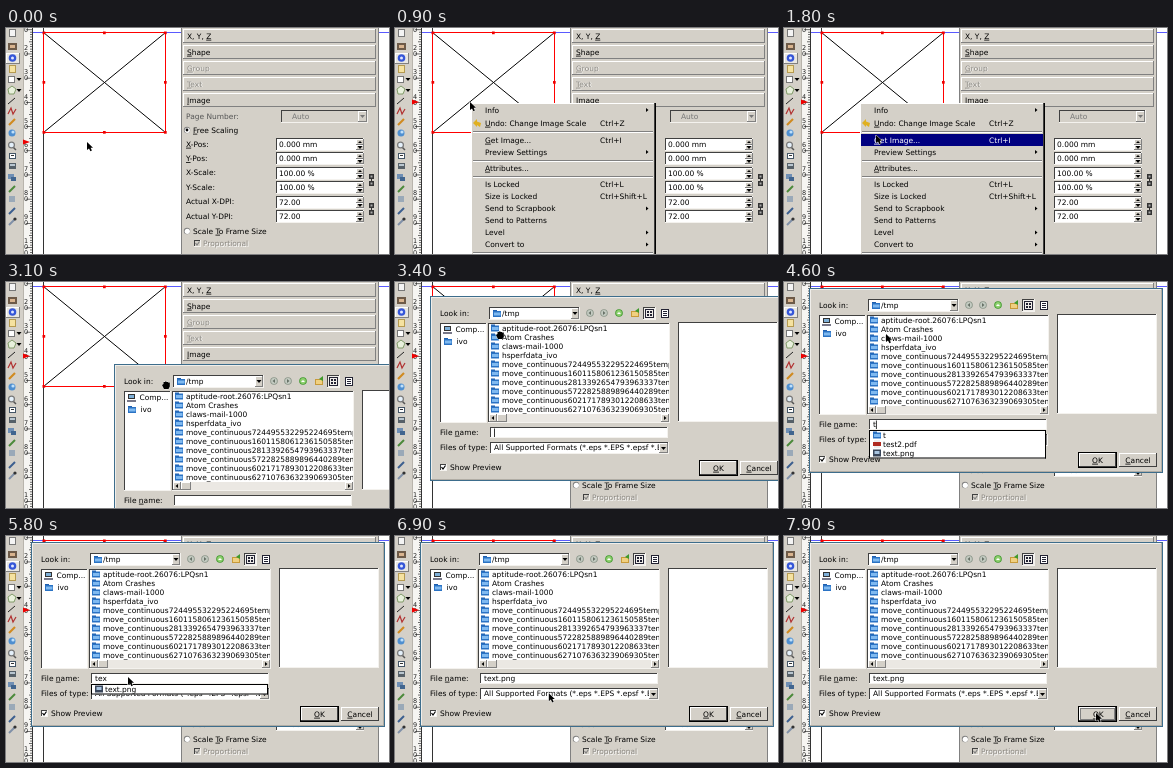
Recreate the animation shown at these times as an HTML page with a canvas. Size 383 by 226 pixels, loop 8000 ms.

```html
<!DOCTYPE html>
<html lang="en">
<head>
<meta charset="utf-8">
<title>Get Image dialog</title>
<style>
html, body { margin: 0; width: 100%; height: 100%; overflow: hidden; background: #fff; }
canvas { display: block; }
</style>
</head>
<body>
<canvas id="stage" width="383" height="226"></canvas>
<script>
const ctx = document.getElementById('stage').getContext('2d');
const LOOP = 8000, STEP = 100;
const FACE = '#d4d0c8', SHADE = '#808080', DARK = '#404040', NAVY = '#000080';

// Keyframes: [time, x, y]
const pointerKeys = [
  [0, 81, 114], [400, 75, 73], [700, 75, 73], [800, 75, 74], [1300, 75, 74], [1400, 78, 80],
  [1500, 84, 94], [1600, 90, 111], [1700, 92, 115], [1800, 92, 107], [2400, 92, 107], [2500, 270, 214],
  [4100, 106, 49], [4200, 102, 52], [5300, 102, 52], [5800, 122, 141], [6000, 122, 148], [6100, 121, 149],
  [6800, 121, 149], [7300, 285, 190], [7400, 300, 192], [7700, 312, 177]];
const handKeys = [[3100, 160, 103], [3200, 121, 66], [3300, 121, 66], [3400, 105, 53], [3600, 101, 49]];
const dialogKeys = [[3100, 83, 76], [3200, 40, 28], [3300, 40, 28], [3400, 10, 8], [3500, 4, 4],
  [3600, 2, 3], [3700, 2, 3], [3800, 1, 1], [3900, 0, 0]];

function at(keys, t) {
  const i = keys.findIndex(k => k[0] > t);
  if (i < 0) return keys[keys.length - 1].slice(1);
  if (i === 0) return keys[0].slice(1);
  const a = keys[i - 1], b = keys[i], p = (t - a[0]) / (b[0] - a[0]);
  return [a[1] + (b[1] - a[1]) * p, a[2] + (b[2] - a[2]) * p];
}

function rect(x, y, w, h, color) {
  ctx.fillStyle = color;
  ctx.fillRect(x, y, w, h);
}

function frame(x, y, w, h, topLeft, bottomRight = topLeft) {
  rect(x, y, w, 1, topLeft);
  rect(x, y, 1, h, topLeft);
  rect(x, y + h - 1, w, 1, bottomRight);
  rect(x + w - 1, y, 1, h, bottomRight);
}

function raised(x, y, w, h, fill = FACE) {
  rect(x, y, w, h, fill);
  frame(x, y, w, h, '#fff', SHADE);
}

function sunken(x, y, w, h, fill = '#fff') {
  rect(x, y, w, h, fill);
  frame(x, y, w, h, DARK, '#f4f2ee');
}

function line(color, width, ...points) {
  ctx.strokeStyle = color;
  ctx.lineWidth = width;
  ctx.beginPath();
  for (let i = 0; i < points.length; i += 2) ctx.lineTo(points[i], points[i + 1]);
  ctx.stroke();
}

function poly(color, ...points) {
  ctx.fillStyle = color;
  ctx.beginPath();
  for (let i = 0; i < points.length; i += 2) ctx.lineTo(points[i], points[i + 1]);
  ctx.closePath();
  ctx.fill();
}

function disc(x, y, r, color) {
  ctx.fillStyle = color;
  ctx.beginPath();
  ctx.arc(x, y, r, 0, 7);
  ctx.fill();
}

function setFont(size = 7.47) {
  ctx.font = size + 'px "DejaVu Sans", sans-serif';
}

// y is the middle of the capitals; "&" underlines the next letter
function text(str, x, y, color = '#000', size = 7.47) {
  setFont(size);
  ctx.fillStyle = color;
  const mark = str.indexOf('&'), plain = str.replace('&', '');
  ctx.fillText(plain, x, y + size * .36);
  if (mark >= 0)
    rect(x + ctx.measureText(plain.slice(0, mark)).width, y + 3.7, ctx.measureText(plain[mark]).width, .8, color);
  return ctx.measureText(plain).width;
}

function disabledText(str, x, y) {
  text(str, x + .8, y + .8, '#fff');
  text(str, x, y, '#8a8780');
}

const down = (x, y, c = '#000') => poly(c, x - 2.5, y - 1, x + 2.5, y - 1, x, y + 2);
const up = (x, y, c = '#000') => poly(c, x - 2, y + 1, x + 2, y + 1, x, y - 1);
const right = (x, y, c = '#000') => poly(c, x - 1, y - 2, x + 1.5, y, x - 1, y + 2);
const left = (x, y, c = '#000') => poly(c, x + 1, y - 2, x - 1.5, y, x + 1, y + 2);

function folder(x, y) {
  rect(x - 4, y - 3.5, 4, 2, '#1f5fae');
  rect(x - 4, y - 2.5, 8, 6, '#2a72c4');
  rect(x - 3, y - 1, 6.5, 3, '#7fb9f0');
}

function toolbar() {
  rect(0, 0, 17, 226, FACE);
  raised(0, 25, 14, 11, '#e9e7e2');
  frame(3, 1, 7, 8, '#777');
  rect(4, 2, 5, 6, '#f4f4f4');
  rect(2, 15, 9, 7, '#6d5a48');
  rect(4, 17, 5, 3, '#d9b48f');
  disc(6.5, 30, 3.8, '#3556d8');
  disc(6.5, 30, 1.5, '#dfe6ff');
  rect(3, 37, 7, 8, '#f5e2a0');
  frame(3, 37, 7, 8, '#b59a50');
  rect(2, 48, 7, 7, '#fff');
  frame(2, 48, 7, 7, '#777');
  poly('#e8f0dc', 6, 58, 10, 61, 8, 66, 3, 66, 2, 61);
  line('#6a8a50', .8, 6, 58, 10, 61, 8, 66, 3, 66, 2, 61, 6, 58);
  down(13, 51);
  down(13, 62);
  line('#222', 1, 2, 76, 9, 70);
  line('#b03030', 1.2, 2, 86, 5, 80, 7, 86, 10, 81);
  line('#d08a20', 2.2, 3, 97, 9, 91);
  disc(6, 105, 3.5, '#4f8fd0');
  disc(7, 104, 1.6, '#bfe0fa');
  line('#555', 1.5, 7, 119, 10, 122);
  disc(5.5, 117, 3.5, '#777');
  disc(5.5, 117, 2.3, '#e4f0fa');
  rect(3, 125, 7, 6, '#fff');
  frame(3, 125, 7, 6, '#456');
  rect(5, 127, 3, 1, '#333');
  rect(3, 135, 7, 6, '#566068');
  rect(4, 136, 5, 2, '#b9c6d0');
  rect(2, 146, 6, 5, '#6f8fb5');
  rect(5, 149, 5, 4, '#41658f');
  line('#4b8a3a', 2, 3, 164, 9, 158);
  rect(3, 168, 6, 6, '#9aa9b8');
  line('#3c5f8f', 2, 3, 186, 9, 180);
  line('#8090a8', 2, 3, 197, 9, 191);
  disc(9, 191, 1.6, '#333');
}

function ruler(markY) {
  rect(17, 0, 10, 226, '#f6f5f2');
  rect(17, 0, 1, 226, '#b8b4ac');
  rect(26, 0, 1, 226, '#333');
  for (let i = 0; i < 94; i++) {
    const len = i % 10 ? (i % 5 ? 2 : 3) : 6;
    rect(26 - len, 13.5 + (i - 5) * 2.42, len, .7, '#333');
  }
  for (let n = 1; n <= 10; n++)
    [...String(n * 10)].forEach((d, i) => text(d, 18, 20 + (n - 2) * 24.1 + i * 6, '#222', 6.5));
  poly('#e00', 17, markY - 2.5, 24, markY, 17, markY + 2.5);
}

function page() {
  rect(0, 0, 383, 226, '#fff');
  rect(27, 4, 356, 1, '#5a5aff');
  rect(37, 0, 1, 226, '#333');
  line('#000', 1, 37.5, 4.5, 159.5, 104.5);
  line('#000', 1, 37.5, 104.5, 159.5, 4.5);
  frame(37, 4, 123, 101, '#f00');
  for (const x of [36.5, 97, 158])
    for (const y of [3.5, 53, 103])
      if (x !== 97 || y !== 53) rect(x, y, 2.7, 2.7, '#e00');
}

function radio(y, on) {
  disc(181, y, 3.2, SHADE);
  disc(181.3, y + .3, 2.6, '#fff');
  if (on) disc(181, y, 1.4, '#000');
}

function spin(y, value) {
  sunken(270, y - 6, 88, 13);
  text(value, 273, y);
  raised(350, y - 5, 8, 6);
  raised(350, y + 1, 8, 5);
  up(354, y - 2);
  down(354, y + 3);
}

function chain(y) {
  rect(363, y - 6, 5, 5, '#333');
  rect(364.5, y - 4.5, 2, 2, '#aaa');
  rect(363, y + 1, 5, 5, '#333');
  rect(364.5, y + 2.5, 2, 2, '#aaa');
  rect(365, y - 2, 1, 4, '#333');
}

function panel() {
  rect(175, 0, 198, 226, FACE);
  rect(175, 0, 1, 226, SHADE);
  rect(372, 0, 1, 226, SHADE);
  ['X, Y, &Z', '&Shape', '&Group', '&Text', '&Image'].forEach((label, i) => {
    const y = 8 + i * 16;
    raised(177, y - 7, 193, 14);
    (i === 2 || i === 3 ? disabledText : text)(label, 181, y);
  });
  text('Page Number:', 180, 88, '#555');
  sunken(275, 82, 87, 13, FACE);
  text('Auto', 286, 88, '#777');
  raised(352, 83, 9, 11);
  down(356.5, 88, '#777');
  radio(102, true);
  text('&Free Scaling', 187, 102);
  const fields = [['&X-Pos:', '0.000 mm'], ['&Y-Pos:', '0.000 mm'], ['X-Scale:', '100.00 %'],
    ['Y-Scale:', '100.00 %'], ['Actual X-DPI:', '72.00'], ['Actual Y-DPI:', '72.00']];
  fields.forEach(([label, value], i) => {
    const y = 116 + i * 14.4;
    text(label, 180, y);
    spin(Math.round(y), value);
  });
  chain(152);
  chain(181);
  radio(203, false);
  text('Scale &To Frame Size', 187, 203);
  sunken(188, 212, 7, 7, FACE);
  line(SHADE, 1.1, 189.5, 215, 191, 217, 193.5, 213.5);
  disabledText('Proportional', 197, 215.5);
}

const menuItems = [
  ['Info', 82, '>'], ['&Undo: Change Image Scale', 95, 'Ctrl+Z'], ['&Get Image...', 112, 'Ctrl+I'],
  ['Preview Settings', 124, '>'], ['&Attributes...', 140], ['Is Locked', 156.5, 'Ctrl+L'],
  ['Size is Locked', 168.5, 'Ctrl+Shift+L'], ['Send to Scrapbook', 180.5, '>'],
  ['Send to Patterns', 192.5], ['Level', 204.5, '>'], ['Convert to', 216.5, '>']];

function menu(pointerY, active) {
  raised(76, 75, 184, 160);
  rect(259, 75, 1, 151, DARK);
  rect(260, 75, 1, 151, '#000');
  for (const y of [103, 132, 148, 224]) {
    rect(78, y, 180, 1, SHADE);
    rect(78, y + 1, 180, 1, '#fff');
  }
  for (const [label, y, extra] of menuItems) {
    const lit = active && Math.abs(pointerY - y) <= 6;
    const color = lit ? '#fff' : '#000';
    if (lit) rect(77, y - 6, 182, 12, NAVY);
    text(label, 90, y, color);
    if (extra === '>') right(252, y, color);
    else if (extra) text(extra, 205, y, color);
  }
  poly('#e0b020', 78, 95, 82, 91, 82, 93.5, 86, 95, 85, 99, 82, 97, 82, 99);
}

const files = ['aptitude-root.26076:LPQsn1', 'Atom Crashes', 'claws-mail-1000', 'hsperfdata_ivo',
  ...['724495532295224695', '1601158061236150585', '2813392654793963337', '5722825889896440289',
    '6021717893012208633', '6271076363239069305'].map(id => 'move_continuous' + id + 'tempor')];

function clipped(x, y, w, h, draw) {
  ctx.save();
  ctx.beginPath();
  ctx.rect(x, y, w, h);
  ctx.clip();
  draw();
  ctx.restore();
}

function button(label, x, y, w, h, pressed) {
  raised(x, y, w, h);
  rect(x, y + h - 1, w, 1, DARK);
  rect(x + w - 1, y, 1, h, DARK);
  if (pressed) frame(x + 1, y + 1, w - 2, h - 2, SHADE);
  setFont();
  const width = ctx.measureText(label.replace('&', '')).width, shift = pressed ? .8 : 0;
  text(label, x + (w - width) / 2 + shift, y + h / 2 + shift);
}

function navIcons() {
  [185, 199, 214].forEach((x, i) => {
    const green = i === 2;
    disc(x, 23, 3.8, green ? '#3f9a2c' : '#8b968a');
    disc(x, 23, 2.9, green ? '#8fd070' : '#c4cbc2');
    [left, right, up][i](x, 23, green ? '#fff' : '#667066');
  });
  rect(226, 21, 8, 6, '#c79a3a');
  rect(227, 22, 6, 4, '#f0d080');
  poly('#3f9a2c', 230, 21, 234, 18, 234, 23);
  sunken(238, 17, 13, 13, '#f0eeea');
  frame(240, 19, 9, 9, '#223');
  for (const x of [242, 245]) for (const y of [21, 24]) rect(x, y, 2, 2, '#223');
  rect(256, 19, 8, 9, '#fff');
  frame(256, 19, 8, 9, '#223');
  for (const y of [21, 23, 25]) rect(258, y, 4, 1, '#223');
}

function popup(rows) {
  const h = rows.length * 9 + 1.5;
  rect(85, 148, 177, h, '#fff');
  frame(85, 148, 177, h, '#000');
  rows.forEach((name, i) => {
    const y = 153 + i * 9;
    if (name === 't') folder(93, y);
    else if (name.endsWith('pdf')) {
      rect(90, y - 4, 6, 8, '#eee');
      rect(89, y - 2, 8, 4, '#b02a20');
    } else {
      rect(89, y - 3.5, 8, 7, '#39465a');
      rect(90.5, y - 2, 5, 3, '#a8c4e0');
    }
    text(name, 99, y);
  });
}

function dialog(t) {
  rect(25, 6, 354, 185, FACE);
  frame(25, 6, 354, 185, '#3d6d8c');
  frame(26, 7, 352, 183, '#f0eeea', '#b0aca4');
  text('Look in:', 35, 23);
  sunken(84, 17, 91, 13);
  folder(92, 23.5);
  text('/tmp', 97, 23.5);
  raised(166, 18, 8, 11);
  down(170, 23);
  navIcons();

  sunken(35, 33, 47, 100);
  rect(39, 36, 7, 5, '#333');
  rect(40, 37, 5, 3, '#7fb0d8');
  rect(38, 42, 9, 2, '#778');
  text('Comp...', 50.5, 39.5);
  folder(43, 51.5);
  text('ivo', 51.5, 51.5);

  sunken(83, 33, 182, 100);
  clipped(84, 34, 180, 90, () => files.forEach((name, i) => {
    folder(90, 38 + i * 9);
    text(name, 97, 38 + i * 9);
  }));
  rect(84, 124, 180, 8, '#ebe8e3');
  raised(84, 124, 8, 8);
  raised(92, 124, 10, 8);
  raised(256, 124, 8, 8);
  left(88, 128);
  right(260, 128);
  sunken(273, 32, 100, 100);

  text('File &name:', 35, 142);
  sunken(85, 137, 178, 11);
  const typed = t < 4600 ? '' : t < 4700 ? 't' : t < 5000 ? 'te' : t < 6400 ? 'tex' : 'text.png';
  const width = text(typed, 89, 142.5);
  const caret = (t >= 3400 && t < 4100) || (t >= 4600 && t < 5500) || (t >= 6000 && t < 6900);
  if (caret) rect(89 + width, 138.5, .8, 8.5, '#000');

  text('Files of type:', 35, 157);
  sunken(85, 152, 179, 12);
  clipped(86, 153, 168, 10, () => text('All Supported Formats (*.eps *.EPS *.epsf *.EPSF)', 89, 157.5));
  raised(254, 153, 9, 10);
  down(258.5, 158);

  sunken(35, 174, 7, 7);
  line('#000', 1.2, 36.5, 177, 38, 179, 40.5, 175.5);
  text('Show Preview', 45, 177.5);
  rect(294, 170, 39, 16, '#000');
  button('&OK', 295, 171, 37, 14, t >= 7900);
  button('&Cancel', 335, 171, 38, 14, false);

  if (t >= 4600 && t < 6400)
    popup(['t', 'test2.pdf', 'text.png'].slice(t < 4700 ? 0 : t < 5000 ? 1 : 2));
}

function pointer(path, outline, x, y) {
  const shape = new Path2D(path);
  ctx.save();
  ctx.translate(x, y);
  ctx.strokeStyle = '#fff';
  ctx.lineWidth = outline;
  ctx.stroke(shape);
  ctx.fillStyle = '#000';
  ctx.fill(shape);
  ctx.restore();
}

const arrow = (x, y) => pointer('M0 0V8L2 6.4L3.4 9.2L4.9 8.5L3.6 5.8H6Z', 1, x, y);
const hand = (x, y) => pointer('M-4 0L-2.5 -1V-3H-1V-3.5H.5V-3H2V-2.5H3.8V1.5L2.5 4H-2Z', .6, x, y);

function draw(now) {
  const t = Math.floor(now % LOOP / STEP) * STEP;
  const [px, py] = at(pointerKeys, t);
  page();
  toolbar();
  ruler(t < 900 ? py : 74);
  panel();
  if (t >= 900 && t < 2200) menu(py, t >= 1400);
  if (t >= 3100) {
    ctx.save();
    ctx.translate(...at(dialogKeys, t).map(Math.round));
    dialog(t);
    ctx.restore();
  }
  if (t >= 3100 && t < 4100) hand(...at(handKeys, t));
  else if (t < 2600 || t >= 4100) arrow(px, py);
}

ctx.textRendering = 'geometricPrecision';
const start = performance.now();
(function tick() {
  draw(performance.now() - start);
  requestAnimationFrame(tick);
})();
</script>
</body>
</html>
```
